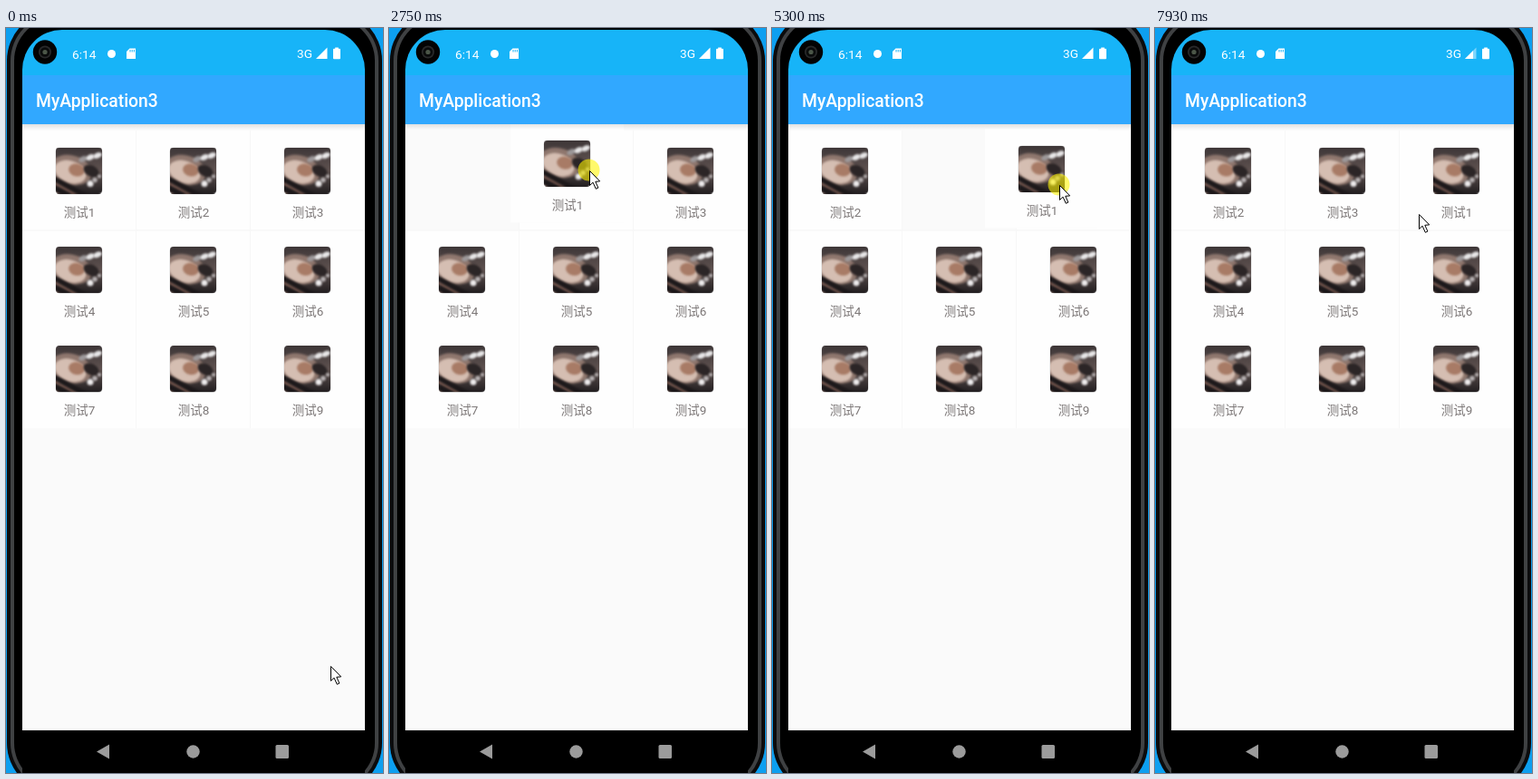
An HTML page with a canvas that plays this animation: 416 by 821 pixels, repeating every 8 s.

```html
<!DOCTYPE html>
<html lang="zh">
<head>
<meta charset="utf-8">
<style>
  html, body { margin: 0; width: 100%; height: 100%; overflow: hidden; background: #0d9ff0; }
  canvas { display: block; }
</style>
</head>
<body>
<canvas id="stage" width="416" height="821"></canvas>
<script>
const LOOP = 8000, COL = 126, ROW = 109.3;
const SLOP = 25;   // pointer travel before a lifted item follows
const SETTLE = 250;
const FONT = 'Roboto, "Noto Sans CJK SC", "Noto Sans CJK", sans-serif';
const ctx = document.getElementById('stage').getContext('2d');

const home = { x: 358, y: 704 };
const moves = [
  { from: 0, to: 1270, x: 80, y: 165 },
  { from: 2130, to: 3130, x: 240, y: 156 },
  { from: 3130, to: 3740, x: 200, y: 186 },
  { from: 3870, to: 4260, x: 201, y: 175 },
  { from: 4920, to: 5960, x: 384, y: 172 },
  { from: 5960, to: 6050, x: 281, y: 235 },
  { from: 6050, to: 6930, x: 334, y: 170 },
  { from: 7790, to: 7930, x: 291, y: 205 }
];
// Each drag carries item 1 one column to the right.
const drags = [
  { press: 1470, lift: 2130, swap: 2960, drop: 3130 },
  { press: 4260, lift: 4730, swap: 5520, drop: 5960 }
];

const mix = (a, b, p) => a + (b - a) * p;
const part = (t, from, to) => Math.min(1, Math.max(0, (t - from) / (to - from)));
const within = (t, a, b) => t >= a && t < b;
const slowDown = p => 1 - (1 - p) ** 2.2;
const smooth = p => (1 - Math.cos(Math.PI * p)) / 2;
const settle = (t, start) => smooth(part(t, start, start + SETTLE));

function pointerAt(t) {
  return moves.reduce((pos, m) => {
    const p = slowDown(part(t, m.from, m.to));
    return { x: mix(pos.x, m.x, p), y: mix(pos.y, m.y, p) };
  }, home);
}

// Offset of item 1 from the first cell.
function itemAt(t) {
  let x = 0, y = 0;
  drags.forEach((d, i) => {
    if (t < d.lift) return;
    const grip = pointerAt(d.lift), hand = pointerAt(Math.min(t, d.drop));
    const p = settle(t, d.drop + 90);
    x = mix(i * COL + Math.max(0, hand.x - grip.x - SLOP), (i + 1) * COL, p);
    y = mix(hand.y - grip.y, 0, p);
  });
  return [x, y];
}

function rect(color, x, y, w, h) {
  ctx.fillStyle = color;
  ctx.fillRect(x, y, w, h);
}

function rounded(color, x, y, w, h, r) {
  ctx.fillStyle = color;
  ctx.beginPath();
  ctx.roundRect(x, y, w, h, r);
  ctx.fill();
}

function ellipse(c, color, x, y, rx, ry = rx, turn = 0) {
  c.fillStyle = color;
  c.beginPath();
  c.ellipse(x, y, rx, ry, turn, 0, 2 * Math.PI);
  c.fill();
}

function poly(color, ...pts) {
  ctx.fillStyle = color;
  ctx.beginPath();
  for (let i = 0; i < pts.length; i += 2) ctx.lineTo(pts[i], pts[i + 1]);
  ctx.closePath();
  ctx.fill();
}

function text(str, x, y, font, color, align = 'left') {
  ctx.font = `${font} ${FONT}`;
  ctx.fillStyle = color;
  ctx.textAlign = align;
  ctx.fillText(str, x, y);
}

// Soft abstract picture shared by all items.
function makeThumb() {
  const cv = document.createElement('canvas');
  cv.width = cv.height = 51;
  const c = cv.getContext('2d');
  c.beginPath();
  c.roundRect(0, 0, 51, 51, 4);
  c.clip();
  const g = c.createLinearGradient(0, 0, 0, 51);
  g.addColorStop(0, '#3d3637');
  g.addColorStop(.5, '#5f5250');
  g.addColorStop(1, '#231f21');
  c.fillStyle = g;
  c.fillRect(0, 0, 51, 51);
  c.filter = 'blur(.8px)';
  ellipse(c, '#8f776e', 17, 25, 23, 16, .3);
  ellipse(c, '#d5beb2', 16, 27, 18, 12, .35);
  ellipse(c, '#a87b66', 23, 25, 9, 7, .2);
  ellipse(c, '#2b2526', 39, 26, 9, 6, .5);
  // Slanted strips along the lower left edge
  for (let i = 0; i < 4; i++) {
    c.strokeStyle = i % 2 ? '#805d52' : '#1d191b';
    c.lineWidth = i % 2 ? 2 : 5;
    c.beginPath();
    c.moveTo(-3, 34 + i * 5);
    c.lineTo(36, 55 + i * 5);
    c.stroke();
  }
  // Highlights at the upper right, smaller ones below
  for (let i = 0; i < 3; i++) {
    ellipse(c, i ? '#e9e8e9' : '#9d999b', 30 + i * 8, 13 - i * 2, 5, 3, -.4);
    ellipse(c, i ? '#b9b4b5' : '#eeeced', 38 + i * 5, 40 - i * 4, 3.5 - i * .7);
  }
  return cv;
}

const thumb = makeThumb();

function cell(n, dx, dy, color = '#fefefe') {
  const x = 18 + dx, y = 113 + dy;
  rect(color, x, y, 125, 109.5);
  rounded('rgba(0,0,0,.15)', x + 36.5, y + 18.5, 52, 52, 5);
  ctx.drawImage(thumb, x + 37, y + 18.5);
  text('测试' + n, x + 63, y + 94.5, '13.5px', '#7c7777', 'center');
}

function items(t) {
  rect('#fafafa', 18, 106, 378, 668);
  for (let n = 4; n <= 9; n++) cell(n, (n - 1) % 3 * COL, Math.floor((n - 1) / 3) * ROW);
  drags.forEach((d, i) => cell(i + 2, COL * (i + 1 - settle(t, d.swap)), 0));
  rect('#f5f5f5', 18, 222.5, 378, 1);
  for (const x of [143, 269]) rect('#f7f7f7', x, 113, 1, 328);
  const pressed = drags.some(d => within(t, d.press + 200, d.lift));
  cell(1, ...itemAt(t), pressed ? '#f2f2f2' : undefined);
  const g = ctx.createLinearGradient(0, 106, 0, 112);
  g.addColorStop(0, 'rgba(0,0,0,.1)');
  g.addColorStop(1, 'rgba(0,0,0,0)');
  rect(g, 18, 106, 378, 6);
}

function topBars(t) {
  rect('#17b4f8', 18, 2, 378, 50);
  rect('#31a8ff', 18, 52, 378, 54);
  text('MyApplication3', 33, 87, '500 19.3px', '#fff');
  text('6:14', 73, 33.5, '13.7px', '#fff');
  text('3G', 321, 33, '13.7px', '#fff');
  ellipse(ctx, '#fff', 116.5, 28.5, 4.5);
  poly('#fff', 136.5, 22.5, 143, 22.5, 143, 34, 133, 34, 133, 26);
  for (let i = 0; i < 3; i++) rect('#17b4f8', 136.5 + i * 2.2, 24, 1, 2.5);
  const weak = t >= 6600;
  poly(weak ? 'rgba(255,255,255,.45)' : '#fff', 342, 34, 354.5, 34, 354.5, 21.5);
  if (weak) poly('#fff', 342, 34, 351, 34, 351, 25);
  rect('#fff', 363.2, 21.5, 3.6, 2);
  rounded('#fff', 361, 22.8, 8, 11.4, 1);
  ellipse(ctx, '#030303', 43, 26.5, 13.2);
  ellipse(ctx, '#29292a', 43, 26.5, 7);
  ellipse(ctx, '#0a0b0b', 43, 26.5, 5.3);
  ellipse(ctx, '#4b5648', 43, 26.5, 2.6);
}

function phone() {
  rect('#0d9ff0', 0, 0, 416, 821);
  ['#0b0b0c', '#3f4143', '#000'].forEach((color, i) => {
    const inset = 1 + i * 4;
    rounded(color, inset, inset - 20, 416 - 2 * inset, 864 - 2 * inset, 56 - inset);
  });
}

function navBar() {
  const gray = '#9b9b9b';
  rect('#000', 18, 774, 378, 47);
  poly(gray, 100, 797.5, 114, 789.5, 114, 805.5);
  ellipse(ctx, gray, 206.5, 797.5, 7.2);
  rounded(gray, 297.5, 790, 14.5, 15, 1.5);
}

function pointer(t) {
  const pos = pointerAt(t), x = Math.round(pos.x), y = Math.round(pos.y);
  if (drags.some(d => within(t, d.press, d.drop))) {
    ellipse(ctx, 'rgba(255,245,0,.58)', x - .5, y - .5, 12);
  }
  ctx.save();
  ctx.translate(x + .5, y + .5);
  poly('#fff', 0, 0, 0, 16, 3.6, 12.7, 6.8, 19.8, 9.4, 18.6, 6.3, 11.8, 11.2, 11.4);
  ctx.strokeStyle = '#000';
  ctx.stroke();
  ctx.restore();
}

function draw(t) {
  phone();
  ctx.save();
  ctx.beginPath();
  ctx.roundRect(18, 2, 378, 819, [44, 44, 0, 0]);
  ctx.clip();
  items(t);
  topBars(t);
  navBar();
  ctx.restore();
  pointer(t);
}

const start = performance.now();
(function frame() {
  draw((performance.now() - start) % LOOP);
  requestAnimationFrame(frame);
})();
</script>
</body>
</html>
```
